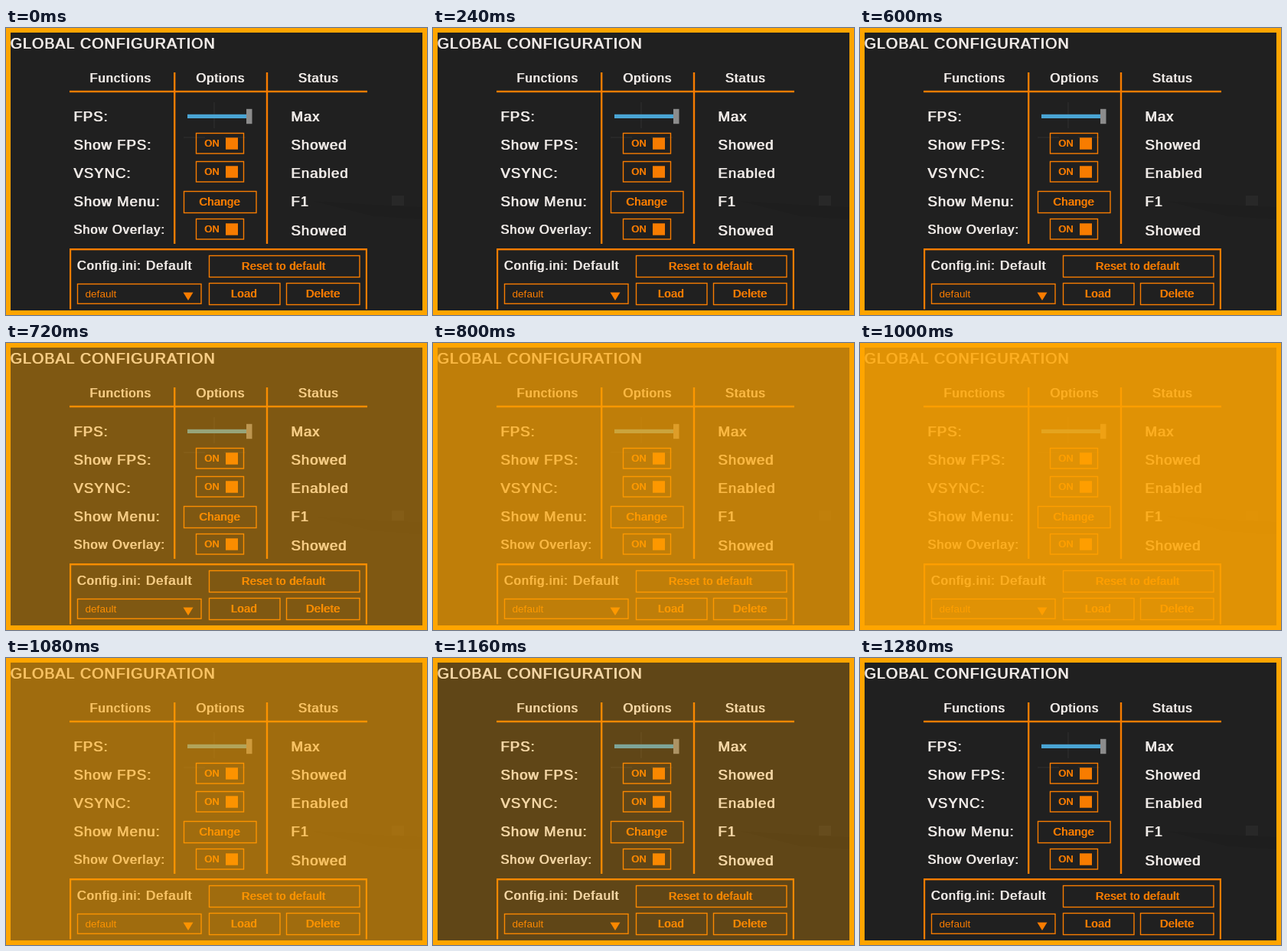
Recreate the animation shown at these times as an HTML page with a canvas. Size 550 by 375 pixels, loop 1320 ms.

```html
<!DOCTYPE html>
<html lang="en">
<head>
<meta charset="utf-8">
<title>Global configuration</title>
<style>
html, body { margin: 0; overflow: hidden; background: #ffa500 }
canvas { display: block }
</style>
</head>
<body>
<canvas id="stage" width="550" height="375"></canvas>
<script>
const ctx = document.getElementById('stage').getContext('2d');
const AMBER = '#ffa500', ORANGE = '#f87c00', WHITE = '#efeae7';
const LOOP = 1320, STEP = 40;

function fill(color, x, y, w, h) {
  ctx.fillStyle = color;
  ctx.fillRect(x, y, w, h);
}

function polygon(color, ...points) {
  ctx.fillStyle = color;
  ctx.beginPath();
  for (const [x, y] of points) ctx.lineTo(x, y);
  ctx.fill();
}

// Bold is the regular face printed twice, slightly apart.
function text(str, x, y, size, color = WHITE, bold = 1) {
  ctx.font = `${size}px "Liberation Sans", Arial, sans-serif`;
  ctx.letterSpacing = bold + 'px';
  ctx.fillStyle = color;
  ctx.fillText(str, x, y);
  if (bold) ctx.fillText(str, x + .9, y);
}

function box(x, y, w, h) {
  ctx.strokeStyle = ORANGE;
  ctx.lineWidth = 1.4;
  ctx.strokeRect(x + .5, y + .5, w, h);
}

function button(label, x, y, w, textX) {
  box(x, y, w, 28);
  text(label, textX, y + 19, 14.5, ORANGE, .5);
}

function toggle(y) {
  box(248, y, 62, 26.5);
  text('ON', 259, y + 18, 12.4, ORANGE, .5);
  fill(ORANGE, 287, y + 6.3, 16, 15.4);
}

function drawBackdrop() {
  fill(AMBER, 0, 0, 550, 375);
  fill('#202020', 6, 6, 538, 363);
  const faint = 'rgba(255,255,255,.035)';
  fill(faint, 232, 142, 28, 2);
  fill(faint, 285, 142, 28, 2);
  fill(faint, 271, 97, 2, 34);
  fill(faint, 504, 219, 16, 13);
  polygon('rgba(0,0,0,.06)', [400, 226], [500, 232], [544, 234], [544, 250], [480, 246]);
}

function drawTable() {
  text('GLOBAL CONFIGURATION', 5.3, 27, 19.7);
  text('Functions', 109, 71, 16.5);
  text('Options', 248, 71, 16.5);
  text('Status', 381.5, 71, 16.5);
  fill(ORANGE, 83, 81.8, 389, 2.4);
  fill(ORANGE, 219, 58, 2.4, 224);
  fill(ORANGE, 339.8, 58, 2.4, 224);

  const rows = [
    ['FPS:', 'Max', 122], ['Show FPS:', 'Showed', 159],
    ['VSYNC:', 'Enabled', 196], ['Show Menu:', 'F1', 233]
  ];
  for (const [name, status, y] of rows) {
    text(name, 88, y, 18.6);
    text(status, 372, y, 18.6);
  }
  text('Show Overlay:', 88, 269, 16.4);
  text('Showed', 372, 271, 18.6);

  fill('#4aa5d4', 237, 112.8, 77, 5.2);
  fill('#8c8c8c', 314, 105.8, 7.5, 19.4);
  [137, 174, 249].forEach(toggle);
  button('Change', 232, 213, 94.5, 252);
}

function drawPanel() {
  fill(ORANGE, 83, 288, 389, 2.4);
  fill(ORANGE, 83, 288, 2.2, 79.5);
  fill(ORANGE, 469.8, 288, 2.2, 79.5);
  text('Config.ini:', 92.5, 316, 16.4);
  text('Default', 182.5, 316, 16.9);
  button('Reset to default', 265, 297, 196.5, 307.5);
  button('Load', 265, 333, 92.5, 293.5);
  button('Delete', 366, 333, 95.5, 391.5);
  box(93, 334, 161.5, 25.7);
  text('default', 103.5, 352, 13.6, ORANGE, 0);
  polygon(ORANGE, [231.5, 345.5], [244.5, 345.5], [238, 356]);
}

// Amber flash: seven steps up, a short hold, seven steps down.
function flash(time) {
  const step = Math.floor(time / STEP);
  return Math.max(0, Math.min(1, (step - 15) / 7, (31 - step) / 7));
}

function draw(time) {
  drawBackdrop();
  drawTable();
  drawPanel();
  ctx.globalAlpha = flash(time % LOOP);
  fill(AMBER, 6, 6, 538, 363);
  ctx.globalAlpha = 1;
}

const start = performance.now();
function tick() {
  draw(performance.now() - start);
  requestAnimationFrame(tick);
}
tick();
</script>
</body>
</html>
```
